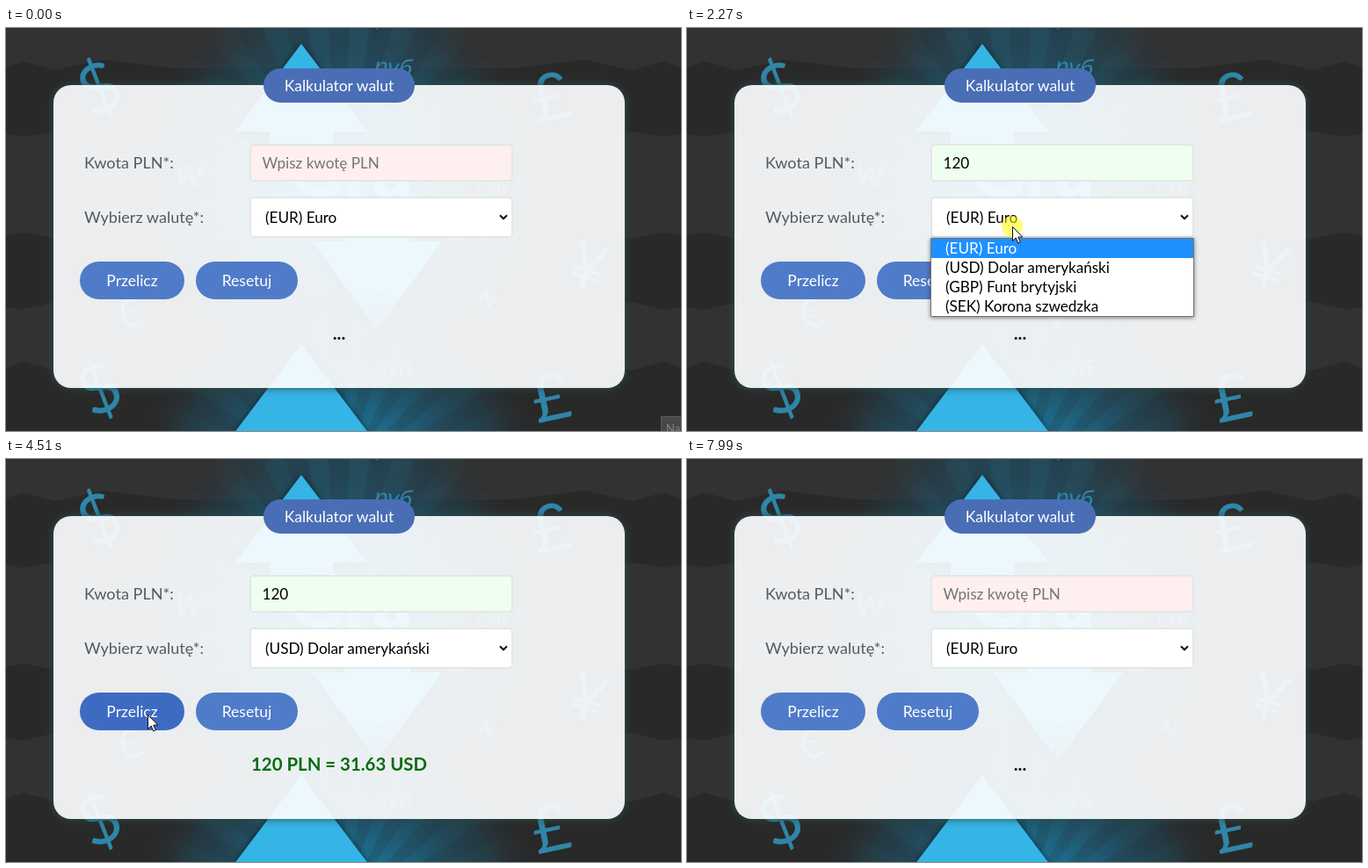
An HTML page for the animation above (8.32 s loop, 768 by 459 pixels).

```html
<!DOCTYPE html>
<html lang="pl">
<head>
<meta charset="utf-8">
<title>Kalkulator walut</title>
<style>
html, body { margin: 0; height: 100%; overflow: hidden; background: #323232; }
svg { display: block; width: 768px; height: 459px; font: 17.1px Lato, sans-serif; }
text { white-space: pre; }
.symbols { fill: #2f86a8; text-anchor: middle; }
.label { font-size: 18.1px; fill: #555a5d; }
.card { height: 345px; border-radius: 20px; background: rgba(252, 254, 255, .92); box-shadow: 0 0 10px #2f4f4f; }
.button text { font-size: 17.5px; fill: #fff; text-anchor: middle; }
#result { font-size: 20.4px; font-weight: bold; text-anchor: middle; }
#list { filter: drop-shadow(0 1px 2.5px rgba(0, 0, 0, .5)); }
</style>
</head>
<body>
<svg viewBox="0 0 768 459">
  <defs>
    <radialGradient id="glow">
      <stop offset="0" stop-color="#2187ae"/>
      <stop offset=".35" stop-color="#1d6b8a"/>
      <stop offset=".55" stop-color="#1f5a74" stop-opacity=".85"/>
      <stop offset=".8" stop-color="#214f61" stop-opacity=".5"/>
      <stop offset="1" stop-color="#2a3a40" stop-opacity="0"/>
    </radialGradient>
    <g id="tile">
      <path id="folds" fill="#292929" d="M-20 52L20 38 56 48 110 36 190 46H384V120H190L110 128 56 118 18 124-20 116z
        M-20 240L20 233 56 240 110 230 190 240H384V316H190L110 322 56 312 18 321-20 314z"/>
      <use href="#folds" transform="matrix(-1 0 0 1 768 0)"/>
      <circle cx="379" cy="180" r="230" fill="url(#glow)"/>
      <g id="rays" fill="#262a2c" fill-opacity=".16"/>
      <g fill="#35b4e6" style="filter: drop-shadow(0 2px 4px rgba(0, 0, 0, .7))">
        <path d="M336 18L411.5 118H372V150H300V118H260.5z"/>
        <path d="M422 344L348 243H385V205H460V243H496z"/>
      </g>
      <g class="symbols">
        <text transform="translate(106 68) rotate(-25)" y="28" font-size="78">$</text>
        <text transform="translate(625 104) rotate(-12)" font-size="74">£</text>
        <text transform="translate(440 54) rotate(6)" font-size="28" font-style="italic">руб</text>
        <text transform="translate(655 296) rotate(17)" font-size="72">¥</text>
        <text transform="translate(146 341) rotate(-18)" font-size="46">€</text>
        <text transform="translate(206 180) rotate(8)" font-size="34">₩</text>
        <text transform="translate(545 317) rotate(20)" font-size="26">₦</text>
        <text transform="translate(556 190) rotate(-6)" font-size="20">CHF</text>
        <text x="392" y="192" font-size="88" font-weight="900" fill="#4fb4da">Gra</text>
      </g>
    </g>
  </defs>

  <use href="#tile" y="-342"/>
  <use href="#tile"/>
  <use href="#tile" y="342"/>
  <g id="tip">
    <path fill="#484848" stroke="#5a5a5a" d="M745.5 442.5H780V470H745.5z"/>
    <text x="751" y="461" font-size="13" fill="#858585">Na</text>
  </g>

  <foreignObject x="54" y="65" width="650" height="345" overflow="visible"><div class="card"></div></foreignObject>
  <g class="button">
    <rect x="293" y="46" width="172" height="39" rx="19.5" fill="#4a6eb5"/>
    <text x="379" y="72">Kalkulator walut</text>
  </g>

  <text class="label" x="89" y="160">Kwota PLN*:</text>
  <rect id="input" x="278" y="133" width="298" height="41" rx="4" stroke-width="2"/>
  <text id="amount" x="291.5" y="160"></text>
  <path id="caret" d="M0 145V162" stroke="#000"/>
  <g id="spinner">
    <path fill="#e6e9e6" d="M548 145H563V162H548z"/>
    <path fill="#444" d="M551.5 151.5L555.5 147 559.5 151.5zM551.5 155.5H559.5L555.5 160z"/>
  </g>

  <text class="label" x="89" y="222">Wybierz walutę*:</text>
  <rect id="select" x="278" y="193" width="298" height="45" rx="4" stroke-width="2" fill="#fff"/>
  <text id="currency" x="295" y="222"></text>
  <path d="M562 213.3L566 217.3 570 213.3" fill="none" stroke="#111" stroke-width="2"/>

  <g class="button">
    <rect id="convert" x="84" y="266" width="119" height="43" rx="21.5"/>
    <text x="143.5" y="294">Przelicz</text>
    <rect id="reset" x="216" y="266" width="116" height="43" rx="21.5"/>
    <text x="274" y="294">Resetuj</text>
  </g>
  <text id="result" x="379" y="355"></text>

  <g id="list">
    <path fill="#fff" stroke="#767676" d="M277.5 239.5H576.5V328.5H277.5z"/>
    <rect id="mark" x="278" width="298" height="22" fill="#1e90ff"/>
  </g>

  <circle id="click" r="12" fill="#ff0" fill-opacity=".55"/>
  <path id="arrow" fill="#fff" stroke="#111" d="M.5 .5V16.5L4.2 13 6.8 19 9.3 17.9 6.8 12H11.8z"/>
  <path id="beam" fill="none" stroke="#222" d="M-3.5-7.5H-1L.5-6.5 2-7.5H4.5M.5-6.5V6.5M-3.5 7.5H-1L.5 6.5 2 7.5H4.5"/>
</svg>
<script>
const LOOP = 8320;
const $ = id => document.getElementById(id);
const set = (id, attrs) => {
  for (const name in attrs) $(id).setAttribute(name, attrs[name]);
};
const show = (id, on) => set(id, { visibility: on ? 'visible' : 'hidden' });
const make = (tag, parent, attrs) => {
  const node = document.createElementNS('http://www.w3.org/2000/svg', tag);
  for (const name in attrs) node.setAttribute(name, attrs[name]);
  return parent.appendChild(node);
};

for (let angle = 0; angle < 360; angle += 15)
  make('path', $('rays'), { d: 'M0 0L225-15V15z', transform: `translate(379 180) rotate(${angle})` });

const currencies = ['(EUR) Euro', '(USD) Dolar amerykański', '(GBP) Funt brytyjski', '(SEK) Korona szwedzka'];
const options = currencies.map((name, i) => {
  const option = make('text', $('list'), { x: 294, y: 257 + 22 * i });
  option.textContent = name;
  return option;
});

// Pointer moves: first step, last step, number of steps, target
const start = [775, 462];
const moves = [
  [70, 475, 7, 389, 147],
  [1740, 2190, 7, 370, 226],
  [2660, 2940, 5, 387, 279],
  [3840, 4370, 8, 161, 291],
  [5370, 6040, 10, 296, 286],
  [7370, 7990, 10, 745, 462]
];
const clicks = [[542, 610], [2270, 2330], [3310, 3440], [4440, 4510], [6640, 6770]];
const between = (t, a, b) => t >= a && t < b;

function pointer(t) {
  let [x, y] = start;
  for (const [from, to, steps, toX, toY] of moves) {
    if (t < from) break;
    const step = Math.floor((t - from) / (to - from) * (steps - 1)) + 1;
    const p = Math.min(1, step / steps);
    const eased = p * p * (3 - 2 * p);
    x += (toX - x) * eased;
    y += (toY - y) * eased;
  }
  return [x, y];
}

function draw(t) {
  const [x, y] = pointer(t);
  const inside = (l, top, r, bottom) => x >= l && x < r && y >= top && y < bottom;
  const visible = between(t, 70, 7990);
  const open = between(t, 2270, 3375);
  const focused = between(t, 542, 2270);
  const overInput = visible && inside(277, 132, 577, 175);
  const typed = between(t, 1010, 6770) ? (t < 1150 ? '1' : t < 1540 ? '12' : '120') : '';

  show('tip', t < 70);
  set('input', { fill: typed ? '#efffef' : '#ffefef', stroke: focused ? '#101010' : '#e3e7e8' });
  set('amount', { fill: typed ? '#000' : '#757575' });
  $('amount').textContent = typed || 'Wpisz kwotę PLN';
  const caretX = typed ? Math.round(291.5 + $('amount').getComputedTextLength()) - .5 : 291.5;
  set('caret', { transform: `translate(${caretX})` });
  show('caret', focused && t < 2040);
  show('spinner', focused || overInput);

  set('select', { stroke: between(t, 3375, 4440) ? '#101010' : '#e3e7e8' });
  $('currency').textContent = currencies[between(t, 3375, 6770) ? 1 : 0];
  const row = y < 262 ? 0 : 1;
  show('list', open);
  set('mark', { y: 240 + 22 * row });
  options.forEach((option, i) => option.setAttribute('fill', i === row ? '#fff' : '#000'));

  const shade = over => ({ fill: visible && !open && over ? '#3e6bc2' : '#507bc9' });
  set('convert', shade(inside(84, 266, 203, 309)));
  set('reset', shade(inside(216, 266, 332, 309)));

  const done = between(t, 4510, 6770);
  $('result').textContent = done ? '120 PLN = 31.63 USD' : '...';
  set('result', { fill: done ? '#0b6b12' : '#1a1a1a' });

  const at = { transform: `translate(${Math.round(x)} ${Math.round(y)})` };
  for (const id of ['arrow', 'beam', 'click']) set(id, at);
  show('arrow', visible && !overInput);
  show('beam', overInput);
  show('click', clicks.some(([a, b]) => between(t, a, b)));
}

let begin;
function tick(now) {
  begin ??= now;
  draw((now - begin) % LOOP);
  requestAnimationFrame(tick);
}
draw(0);
requestAnimationFrame(tick);
</script>
</body>
</html>
```
